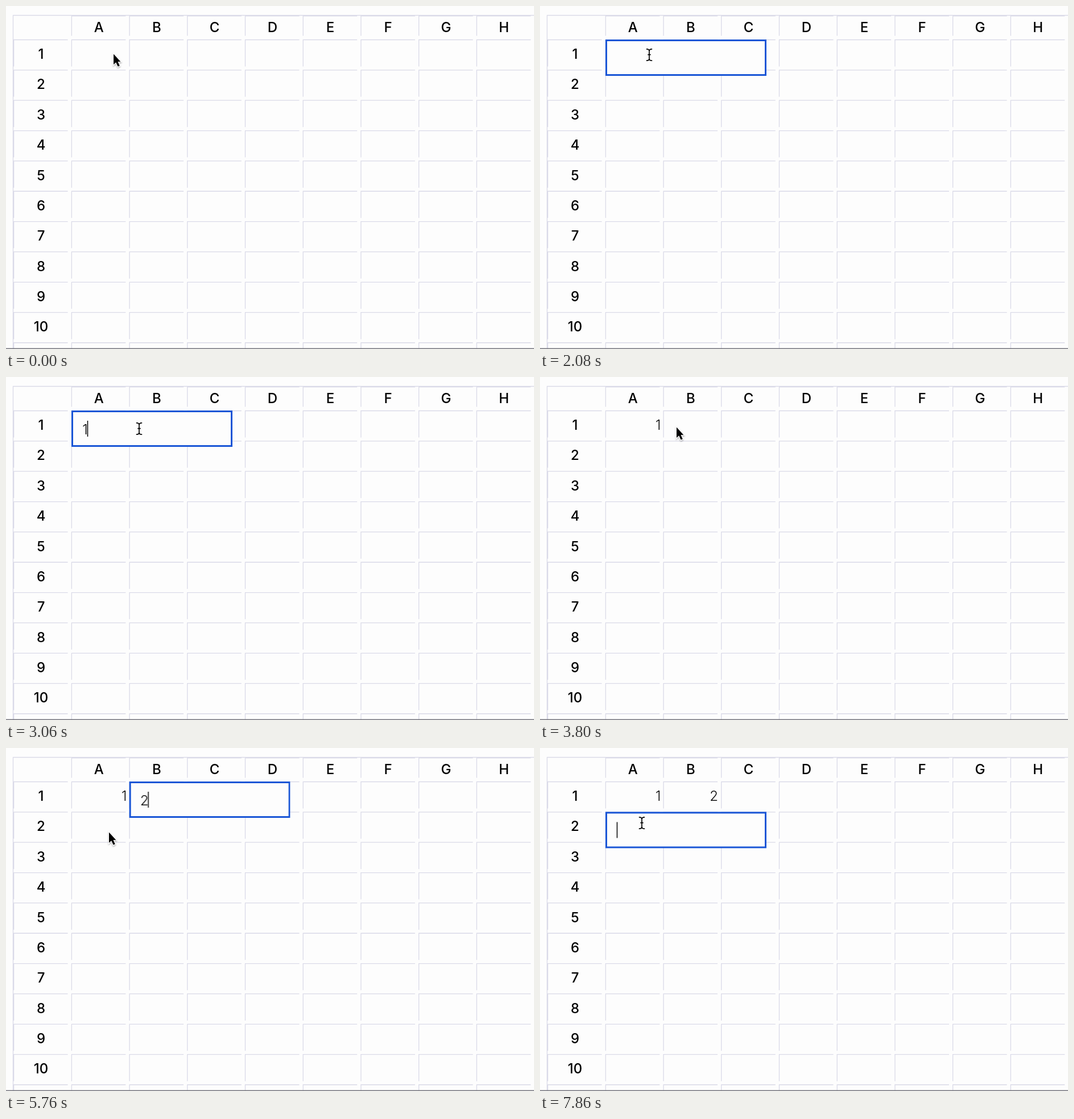
Animation of 928 by 604 pixels, one loop 8 s. Source, as an HTML page:

```html
<!DOCTYPE html>
<html lang="en">
<head>
<meta charset="utf-8">
<title>Spreadsheet</title>
<style>
  html, body { margin: 0; width: 100%; height: 100%; overflow: hidden; background: #fdfdfd; }
  svg { display: block; width: 928px; height: 604px; }
  text { font: 400 24px Inter, "Open Sans", sans-serif; fill: #0a0a0a; }
  .label { font-weight: 500; text-anchor: middle; fill: #000; }
  .value { font-weight: 350; text-anchor: end; }
  .typed { font-weight: 350; }
  .line { fill: none; stroke: #dadae8; stroke-width: 1.3; }

  .anim { animation: 8s step-end infinite; }
  #pointer { animation: move 8s linear infinite; }
  #shown { animation-name: shown; }
  #arrow { animation-name: arrow; }
  #beam { animation-name: beam; }
  #editor { animation-name: editor; }
  #caret { animation-name: caret; }
  #one { animation-name: one; }
  #two { animation-name: two; }
  #a1 { animation-name: a1; }
  #b1 { animation-name: b1; }

  @keyframes move {
    0% { transform: translate(188px, 83px); }
    9%, 10.5% { transform: translate(189px, 86px); }
    14%, 17.75% { transform: translate(188px, 88px); }
    21%, 23% { transform: translate(191px, 86px); }
    26%, 30.5% { transform: translate(192px, 86px); }
    33.5%, 34.75% { transform: translate(222px, 91px); }
    37%, 38.25% { transform: translate(234px, 91px); }
    45.25%, 47.49% { transform: translate(235px, 90px); }
    47.5%, 66.25% { transform: translate(239px, 87px); }
    69% { transform: translate(222px, 126px); }
    72%, 73.25% { transform: translate(180px, 147px); }
    75.5%, 76.75% { transform: translate(179px, 140px); }
    82.25%, 98.24% { transform: translate(179px, 129px); }
    98.25%, 100% { transform: translate(179px, 132px); }
  }
  /* the pointer hides while typing */
  @keyframes shown {
    0%, 30.5%, 66.25% { opacity: 1; }
    28.25%, 60.5% { opacity: 0; }
  }
  @keyframes arrow {
    0%, 41.25%, 68.75% { opacity: 1; }
    9.5%, 55.5%, 89.5% { opacity: 0; }
  }
  @keyframes beam {
    0%, 41.25%, 68.75% { opacity: 0; }
    9.5%, 55.5%, 89.5% { opacity: 1; }
  }
  @keyframes editor {
    0% { opacity: 0; transform: translate(115px, 59px); }
    8.75% { opacity: 1; transform: translate(115px, 59px); }
    41.25% { opacity: 0; transform: translate(115px, 59px); }
    55.5% { opacity: 1; transform: translate(216.6px, 59px); }
    84.5% { opacity: 0; transform: translate(216.6px, 59px); }
    89.5%, 100% { opacity: 1; transform: translate(115px, 112.4px); }
  }
  @keyframes caret {
    0% { opacity: 1; transform: none; }
    23.5% { opacity: 0; transform: none; }
    28.25% { opacity: 1; transform: translateX(8px); }
    41.25% { opacity: 1; transform: none; }
    60.5% { opacity: 1; transform: translateX(13px); }
    74.25% { opacity: 0; transform: translateX(13px); }
    84.5%, 100% { opacity: 1; transform: none; }
  }
  @keyframes one { 0%, 41.25% { opacity: 0; } 28.25% { opacity: 1; } 100% { opacity: 0; } }
  @keyframes two { 0%, 84.5% { opacity: 0; } 60.5% { opacity: 1; } 100% { opacity: 0; } }
  @keyframes a1 { 0% { opacity: 0; } 41.25%, 100% { opacity: 1; } }
  @keyframes b1 { 0% { opacity: 0; } 84.5%, 100% { opacity: 1; } }
</style>
</head>
<body>
<svg viewBox="0 0 928 604">
  <defs>
    <filter id="shadow" x="-50%" y="-50%" width="200%" height="200%">
      <feDropShadow dx="0" dy="1.5" stdDeviation="1.3" flood-color="#000" flood-opacity=".35"/>
    </filter>
  </defs>
  <rect width="928" height="604" fill="#fdfdfd"/>
  <path class="line" d="M928 16.5H12.5V604"/>
  <g id="grid"></g>
  <path d="M0 603.3H928" stroke="#77777f" stroke-width="1.4"/>

  <text id="a1" class="value anim" x="212.5" y="93">1</text>
  <text id="b1" class="value anim" x="313" y="93">2</text>

  <g id="editor" class="anim">
    <rect x="1.5" y="1.5" width="280" height="61" fill="#fdfdfd" stroke="#1a56d6" stroke-width="3"/>
    <text id="one" class="typed anim" x="19.3" y="42">1</text>
    <text id="two" class="typed anim" x="19.3" y="42">2</text>
    <path id="caret" class="anim" d="M20.5 18V46" stroke="#000" stroke-width="1.5"/>
  </g>

  <g id="pointer">
    <g id="shown" class="anim">
      <path id="arrow" class="anim" filter="url(#shadow)" fill="#000" stroke="#fff" stroke-width="2.4"
        paint-order="stroke" d="M1 1.5V20L5.2 16.2L8.6 23.6L11.8 22.2L8.5 14.9H13.4Z"/>
      <g id="beam" class="anim" fill="none" stroke-linecap="round">
        <path id="beamShape" stroke="#fff" stroke-width="3.6"
          d="M-4.5-10.2Q0-10.2 0-6.5Q0-10.2 4.5-10.2M0-6.5V6.5M-4.5 10.2Q0 10.2 0 6.5Q0 10.2 4.5 10.2M-2-.3H2"/>
        <use href="#beamShape" style="display:none"/>
      </g>
    </g>
  </g>
</svg>
<script>
  const NS = 'http://www.w3.org/2000/svg';
  const grid = document.getElementById('grid');
  const colX = i => 115.4 + 101.7 * i;
  const rowY = i => 59.5 + 53.35 * i;

  function add(parent, tag, attrs, text = '') {
    const el = document.createElementNS(NS, tag);
    for (const key in attrs) el.setAttribute(key, attrs[key]);
    el.textContent = text;
    return parent.appendChild(el);
  }

  // Each cell draws only its top and left edges, stopping short of the next cell.
  const cell = (x, y, height = 47) =>
    add(grid, 'path', { class: 'line', d: `M${x + 95} ${y}H${x}V${y + height}` });
  const label = (text, x, y) => add(grid, 'text', { class: 'label', x, y }, text);

  [...'ABCDEFGH'].forEach((letter, i) => {
    cell(colX(i), 17.6, 35);
    label(letter, colX(i) + 47.8, 45.6);
  });
  for (let row = 0; row < 11; row++) {
    cell(13.6, rowY(row));
    for (let col = 0; col < 8; col++) cell(colX(col), rowY(row));
    if (row < 10) label(row + 1, 61.5, rowY(row) + 33.6);
  }

  // Black core over the white halo of the text cursor.
  const halo = document.getElementById('beamShape');
  halo.nextElementSibling.remove();
  add(halo.parentNode, 'path', { d: halo.getAttribute('d'), stroke: '#000', 'stroke-width': 1.7 });
</script>
</body>
</html>
```
